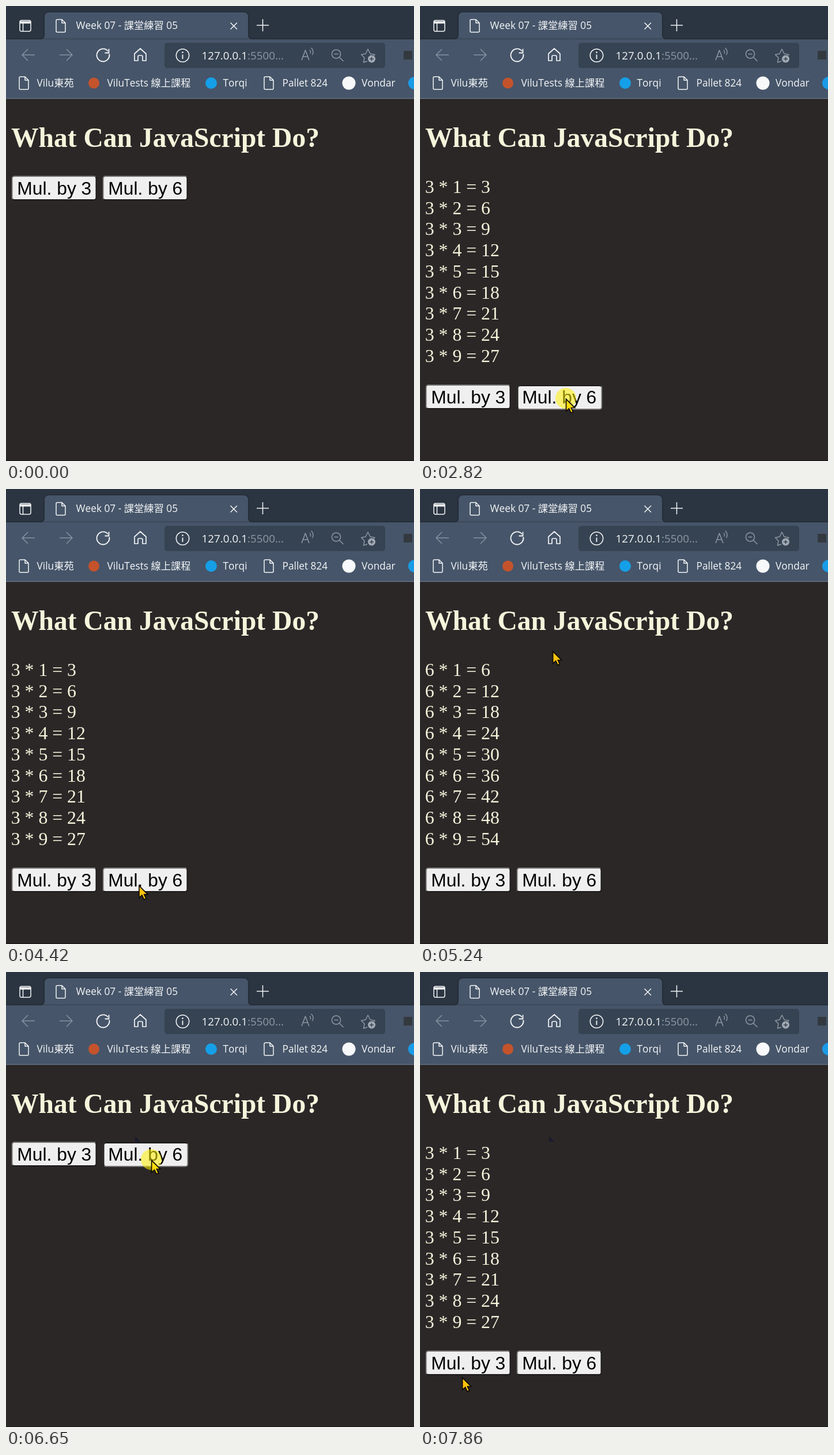
Animation, 708 px wide and 791 px high, one loop 8 s. Source, as an HTML page with a canvas:

```html
<!DOCTYPE html>
<html lang="zh-Hant">
<head>
<meta charset="utf-8">
<title>Multiplication</title>
<style>
html, body { margin: 0; width: 100%; height: 100%; overflow: hidden; background: #2b2727; }
canvas { display: block; }
</style>
</head>
<body>
<canvas id="stage" width="708" height="791"></canvas>
<script>
const ctx = document.getElementById('stage').getContext('2d');
const LOOP = 8000, FIRST = 806, STEP = 201.3;
const UI = '"Open Sans", "Noto Sans CJK TC", "Noto Sans CJK", sans-serif';
const SERIF = '"Liberation Serif", "Times New Roman", serif';
const SANS = '"Liberation Sans", Arial, sans-serif';
const CREAM = '#f5f5dc', WHITE = '#f4f6f8', MUTED = '#8592a2';
const RELOAD = 0, RELOAD_STEP = 24;

// Where the pointer rests, at which step, and what it clicks there.
const STOPS = [
  { at: 0, x: 190, y: 470 },
  { at: 4.5, x: 121, y: 322, hit: 3 },
  { at: 10, x: 253, y: 683, hit: 6 },
  { at: 15, x: 72, y: 671, hit: 3 },
  { at: 19, x: 253, y: 683, hit: 6 },
  { at: 22, x: 230, y: 282 },
  { at: RELOAD_STEP, x: 168, y: 87, hit: RELOAD },
  { at: 29, x: 252, y: 327, hit: 6 },
  { at: 34, x: 73, y: 682, hit: 3 },
  { at: 35, x: 73, y: 705 }
];
const CLICKS = STOPS.filter(s => 'hit' in s);

// Eases out towards the next stop along a slightly sagging path.
function pointerAt(step) {
  const i = STOPS.findIndex(s => s.at >= step);
  const b = STOPS[i], a = STOPS[Math.max(0, i - 1)];
  const f = a === b ? 1 : 1 - ((b.at - step) / (b.at - a.at)) ** 3;
  return [a.x + (b.x - a.x) * f, a.y + (b.y - a.y) * f + 72 * f * (1 - f)];
}

function text(str, x, y, font, color, align = 'left') {
  ctx.font = font;
  ctx.fillStyle = color;
  ctx.textAlign = align;
  ctx.fillText(str, x, y);
}

function rect(x, y, w, h, color) {
  ctx.fillStyle = color;
  ctx.fillRect(x, y, w, h);
}

function round(x, y, w, h, r, color) {
  ctx.fillStyle = color;
  ctx.beginPath();
  ctx.roundRect(x, y, w, h, r);
  ctx.fill();
}

function disc(x, y, r, color) {
  ctx.fillStyle = color;
  ctx.beginPath();
  ctx.arc(x, y, r, 0, 7);
  ctx.fill();
}

function line(path, color = WHITE, width = 1.5) {
  ctx.strokeStyle = color;
  ctx.lineWidth = width;
  ctx.stroke(new Path2D(path));
}

function ring(x, y, r, color, from = 0, to = Math.PI * 2, width = 1.5) {
  ctx.strokeStyle = color;
  ctx.lineWidth = width;
  ctx.beginPath();
  ctx.arc(x, y, r, from, to);
  ctx.stroke();
}

function sheet(x, y) {
  ctx.save();
  ctx.translate(x, y);
  line('M-6-11H2L8-5V9Q8 11 6 11H-6Q-8 11-8 9V-9Q-8-11-6-11ZM2-11V-5H8');
  ctx.restore();
}

function drawTabs() {
  rect(0, 0, 708, 58, '#2b3541');
  ctx.fillStyle = '#465569';
  ctx.shadowColor = 'rgba(0,0,0,.5)';
  ctx.shadowBlur = 3;
  ctx.fill(new Path2D('M59 58Q67 58 67 50V19Q67 11 75 11H412Q420 11 420 19V50Q420 58 428 58Z'));
  ctx.fillRect(0, 58, 708, 104);
  ctx.shadowBlur = 0;
  ctx.shadowColor = 'transparent';

  line('M27 25H40Q43 25 43 28V41Q43 44 40 44H27Q24 44 24 41V28Q24 25 27 25ZM29.5 30V44');
  line('M24 28.5H43', WHITE, 4);
  sheet(95, 34.5);
  text('Week 07 - 課堂練習 05', 121.5, 40, '17.3px ' + UI, WHITE);
  line('M389.5 29L401 40.5M401 29L389.5 40.5');
  line('M435 33.5H456M445.5 23V44');
}

function drawToolbar() {
  line('M50 85H28M38 75L28 85L38 95', MUTED);
  line('M93 85H115M105 75L115 85L105 95', MUTED);
  ring(168.5, 85.5, 11, WHITE, -0.2, Math.PI * 1.78, 1.8);
  line('M178.5 74.5V81.5H171.5', WHITE, 1.8);
  line('M223 83L233 74L243 83V95H237V88Q237 86 235 86H231Q229 86 229 88V95H223Z', WHITE, 1.7);

  round(275, 64, 383, 44, 5, '#364352');
  ring(306.5, 86, 11.2, WHITE);
  line('M306.5 84.5V92', WHITE, 1.8);
  disc(306.5, 80.6, 1.3, WHITE);
  text('127.0.0.1', 339.5, 93, '18.8px ' + UI, WHITE);
  text(':5500...', 419, 93, '18.8px ' + UI, '#8f99a5');

  const dim = '#8c96a2';
  line('M513 94L519.5 77L526 94M515.3 88H523.7', dim, 1.6);
  ring(524, 80, 4.5, dim, -0.9, 0.6);
  ring(524, 80, 9, dim, -0.9, 0.6);
  ring(573, 83.5, 7.6, dim);
  line('M578.5 89L585.5 96M569.5 83.5H576.5', dim);
  line('M627 96L620.5 98L622 90L616.5 84.5L624 83L628 75L632 83L640 84.5L638 86.5', dim);
  disc(634.5, 92, 6.5, '#a3abb5');
  line('M631 92H638M634.5 88.5V95.5', '#364352');
  rect(690, 78, 15, 15, '#33393f');
}

function drawBookmarks() {
  const label = (s, x) => text(s, x, 140, '17.3px ' + UI, WHITE);
  sheet(31, 134);
  label('Vilu東苑', 53.5);
  disc(152.5, 134, 9.5, '#c4532c');
  label('ViluTests 線上課程', 175.5);
  disc(356, 134, 10, '#159fe8');
  label('Torqi', 376.5);
  sheet(456, 134);
  label('Pallet 824', 479.5);
  disc(595, 134, 11.5, '#f7f8fa');
  label('Vondar', 617);
  disc(709, 134, 11, '#1a9be6');
  rect(0, 160, 708, 1.5, '#69778a');
}

function drawButton(n, x, y, pressed) {
  const light = '#777574', dark = '#1b1919', w = 148, h = 43;
  const o = pressed ? 1 : 0;
  ctx.save();
  ctx.translate(x + o, y + o);
  ctx.beginPath();
  ctx.roundRect(0, 0, w, h, 5);
  ctx.clip();
  rect(0, 0, w, h, pressed ? light : dark);
  ctx.fillStyle = pressed ? dark : light;
  ctx.fill(new Path2D(`M0 0H${w}L${w - 3} 3L3 ${h - 3}L0 ${h}Z`));
  round(2, 2, w - 4, h - 4, 3, '#f0eff0');
  ctx.restore();
  text('Mul. by ' + n, x + 74.3, y + 32.5, '31.8px ' + SANS, '#000', 'center');
}

function drawPointer(x, y, down) {
  if (down) disc(x, y - 1, 18, 'rgba(255,242,0,.54)');
  const arrow = new Path2D('M0 0V21L5 16.5L8.5 24L12 22.3L8.8 15.2H15Z');
  ctx.save();
  ctx.translate(x + 0.6, y + 0.3);
  ctx.lineJoin = 'miter';
  ctx.fillStyle = down ? '#ffdc0a' : '#ffc20e';
  ctx.fill(arrow);
  ctx.strokeStyle = '#0c0a08';
  ctx.lineWidth = 1.7;
  ctx.stroke(arrow);
  ctx.restore();
}

function drawPage(step, table, pressed) {
  rect(0, 161.5, 708, 629.5, '#2b2727');
  rect(0, 790, 708, 1, '#151313');
  text('What Can JavaScript Do?', 9, 245, 'bold 47.55px ' + SERIF, CREAM);

  // Speck left behind by the pointer.
  if (step >= RELOAD_STEP) {
    ctx.fillStyle = '#1a1a2f';
    ctx.fill(new Path2D('M224 286L233.5 295H224Z'));
  }

  for (let i = 1; table && i <= 9; i++) {
    text(`${table} * ${i} = ${table * i}`, 8.7, 288 + i * 36.77, '31.8px ' + SERIF, CREAM);
  }
  const y = table ? 658 : 295;
  drawButton(3, 9.5, y, pressed === 3);
  drawButton(6, 167.5, y, pressed === 6);
}

function draw(t) {
  const step = Math.floor((t - FIRST) / STEP);
  const click = CLICKS.find(c => c.at === step);
  const table = CLICKS.filter(c => c.at < step).pop()?.hit ?? 0;
  ctx.fontKerning = 'none';
  ctx.lineJoin = 'round';
  drawTabs();
  drawToolbar();
  drawBookmarks();
  drawPage(step, table, click?.hit);
  if (step >= 0) drawPointer(...pointerAt(Math.min(step, 35)), Boolean(click));
}

const start = performance.now();
function tick() {
  draw((performance.now() - start) % LOOP);
  requestAnimationFrame(tick);
}
tick();
</script>
</body>
</html>
```
